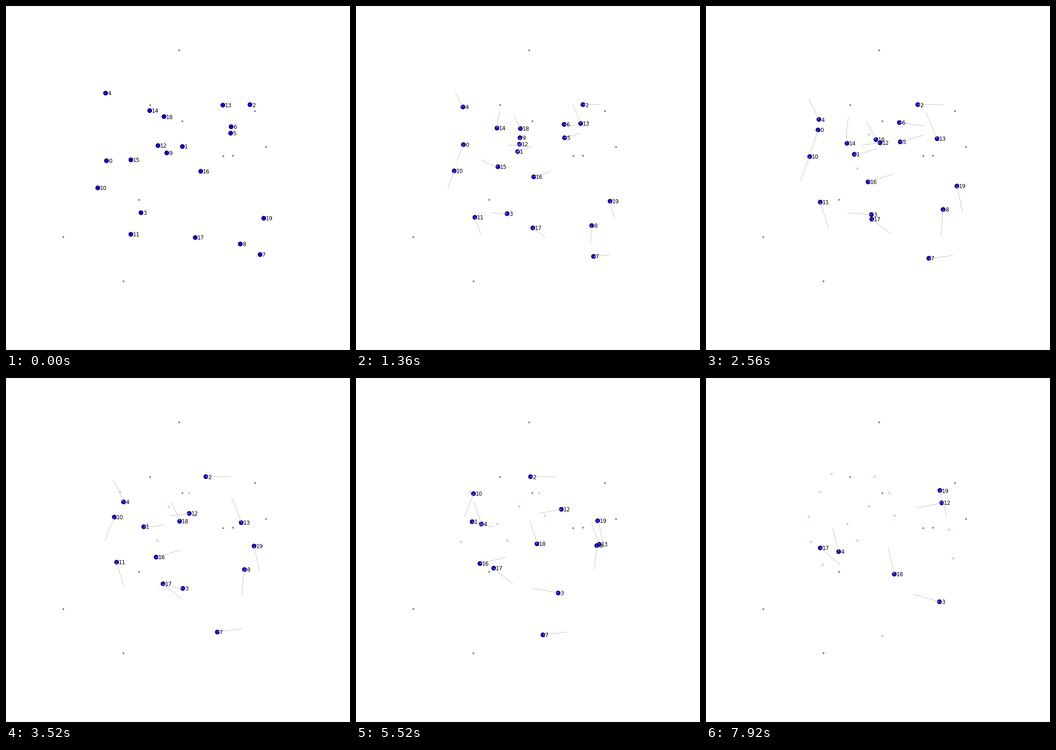
Write a matplotlib script that moves like this. It is 748x748 px and loops after 8000 ms.

```python
import numpy as np
import matplotlib.pyplot as plt
from matplotlib.animation import FuncAnimation
from matplotlib.collections import LineCollection, PolyCollection

SIZE, FRAMES, INTERVAL = 748, 100, 80
TRAIL = 25                      # frames of history shown behind each agent
PX = 0.72                       # points per pixel at 100 dpi

paths = []


def walk(start, goal, frames=FRAMES - 1, bow=(0, 0)):
    """Add an agent moving evenly to its goal, pushed sideways by bow midway."""
    s = np.linspace(0, 1, frames + 1)[:, None]
    start, goal, bow = map(np.array, (start, goal, bow))
    paths.append(np.rint(start + (goal - start) * s + bow * np.sin(np.pi * s)))


walk((218, 336), (248, 247), 42, bow=(3, 1))
walk((383, 305), (223, 301), 84, bow=(0, 20))
walk((530, 214), (366, 214), 75)
walk((293, 449), (507, 486), bow=(-4, -9))
walk((216, 189), (288, 377), bow=(7, -4))
walk((488, 276), (410, 299), 38)
walk((489, 262), (398, 250), 42)
walk((552, 540), (383, 561), 80)
walk((509, 517), (528, 329), 87, bow=(-1, -6))
walk((349, 319), (354, 279), 20, bow=(5, 2))
walk((199, 395), (273, 208), 91, bow=(0, -3))
walk((271, 496), (228, 356), 64, bow=(-2, 0))
walk((330, 303), (512, 271), bow=(-13, 5))
walk((471, 215), (537, 392), 87, bow=(7, 9))
walk((312, 227), (307, 317), 41, bow=(-4, 1))
walk((271, 334), (329, 353), 27, bow=(0, 3))
walk((423, 359), (253, 406), 76, bow=(1, 3))
walk((411, 503), (248, 369), bow=(2, 4))
walk((343, 240), (409, 426), bow=(5, -12))
walk((560, 461), (508, 244), bow=(2, 0))

LANDMARKS = [(376, 96), (313, 215), (383, 250), (541, 228), (565, 306),
             (472, 326), (493, 325), (289, 421), (124, 502), (255, 598)]


def polygon(sides, radius):
    angle = 2 * np.pi * np.arange(sides) / sides
    return radius * np.column_stack([np.cos(angle), np.sin(angle)])


DISC, DIAMOND = polygon(32, 4.6), polygon(4, 2.5)
DIAGONALS = [np.array([(-2, -2), (2, 2)]), np.array([(-2, 2), (2, -2)])]

fig = plt.figure(figsize=(SIZE / 100, SIZE / 100), dpi=100, facecolor="white")
ax = fig.add_axes([0, 0, 1, 1])
ax.set_xlim(-0.5, SIZE - 0.5)
ax.set_ylim(SIZE - 0.5, -0.5)
ax.axis("off")


def layer(kind, order, **style):
    return ax.add_collection(kind([], zorder=order, **style), autolim=False)


landmarks = layer(PolyCollection, 1, facecolors="#808080", edgecolors="none")
landmarks.set_verts([DIAMOND + p for p in LANDMARKS])
crosses = layer(LineCollection, 2, colors="#a0a0ff", linewidths=PX)
dots = layer(PolyCollection, 3, facecolors="#0000ff", edgecolors="black", linewidths=PX)
trails = layer(LineCollection, 4, colors="#c4c4c4", linewidths=PX)
labels = [ax.text(0, 0, str(i), family="DejaVu Sans", size=12 * PX, zorder=5,
                  ha="left", va="baseline") for i in range(len(paths))]


def draw(frame):
    active = [p for p in paths if frame < len(p)]
    done = [p[-1] for p in paths if frame >= len(p)]
    crosses.set_segments([d + p for p in done for d in DIAGONALS])
    dots.set_verts([DISC + p[frame] for p in active])
    trails.set_segments([p[max(0, frame - TRAIL):frame + 1] for p in active]
                        if frame else [])
    for text, path in zip(labels, paths):
        text.set_visible(frame < len(path))
        if frame < len(path):
            text.set_position(path[frame] + (4.5, 5))
    return crosses, dots, trails, *labels


animation = FuncAnimation(fig, draw, frames=FRAMES, interval=INTERVAL,
                          repeat=True, repeat_delay=0)
plt.show()
```
